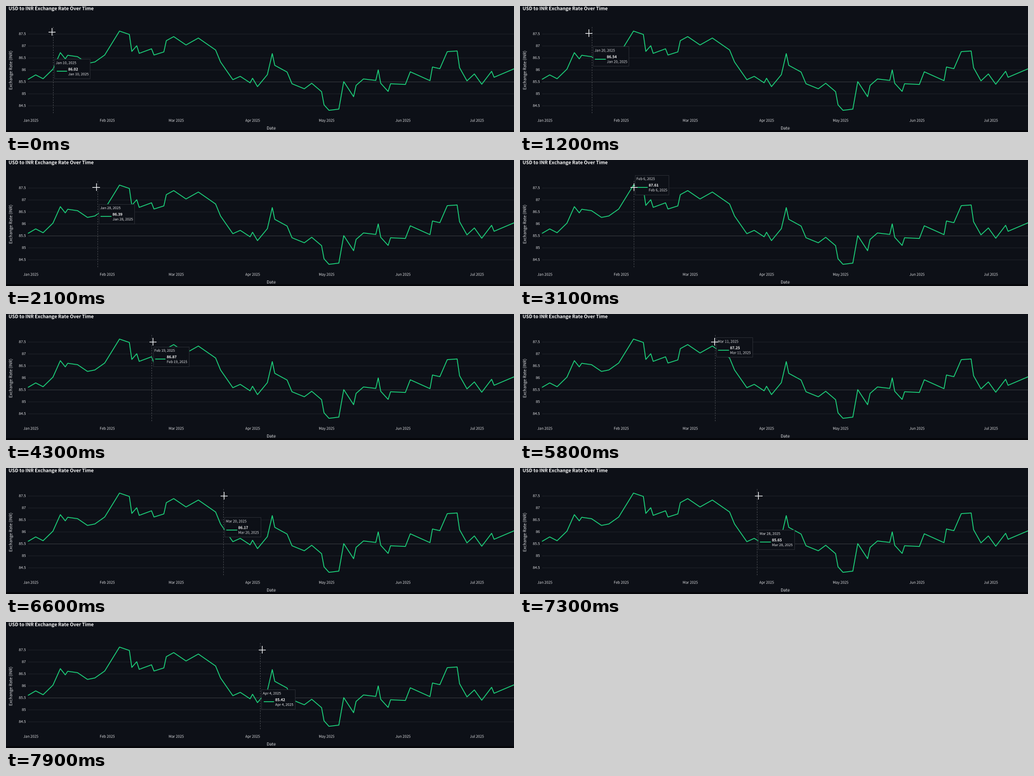
These frames come from a looping animation (800 px wide and 200 px high, 8 s). A matplotlib script:

```python
import numpy as np
import matplotlib.pyplot as plt
from matplotlib.animation import FuncAnimation
from matplotlib.patches import PathPatch, Rectangle
from matplotlib.textpath import TextPath
from matplotlib.transforms import Affine2D

W, H, DPI = 800, 200, 100
FRAMES, STEP = 80, 100
PX = 72 / DPI

BG, GRID, MID_GRID = "#0d1017", "#1c1f26", "#313439"
GREEN, INK = "#1ee083", "#e6e7ea"
MONTHS = "Jan Feb Mar Apr May Jun Jul Aug Sep Oct Nov Dec".split()
START = np.datetime64("2025-01-01")

# Turning points of the rate: day of the year, rate
TURNS = np.array([
    (-1, 85.60), (2, 85.78), (5, 85.62), (9, 86.02), (12, 86.71),
    (14, 86.45), (15, 86.60), (19, 86.54), (23, 86.26), (26, 86.32),
    (30, 86.61), (36, 87.61), (40, 87.47), (41, 86.76), (43, 87.00),
    (44, 86.68), (49, 86.87), (50, 86.61), (54, 86.74), (55, 87.21),
    (58, 87.38), (63, 87.03), (68, 87.32), (75, 86.82), (77, 86.32),
    (82, 85.58), (85, 85.72), (89, 85.45), (90, 85.64), (92, 85.29),
    (96, 85.79), (98, 86.67), (99, 86.18), (104, 85.90), (106, 85.41),
    (111, 85.20), (114, 85.43), (118, 85.08), (119, 84.53), (121, 84.30),
    (125, 84.35), (127, 85.50), (131, 84.87), (132, 85.34), (135, 85.61),
    (140, 85.55), (141, 85.99), (142, 85.43), (145, 85.09), (146, 85.41),
    (152, 85.38), (154, 85.91), (162, 85.54), (163, 86.11), (166, 86.04),
    (169, 86.75), (173, 86.78), (174, 86.08), (177, 85.53), (180, 85.82),
    (183, 85.39), (187, 85.93), (188, 85.68), (196, 86.03)])

# Pointer path: time, x, y
PATH = np.array([
    (0, 71.8, 40.6), (1200, 107.7, 42.6), (3100, 179.2, 42.6),
    (4300, 230.7, 43.5), (5000, 268.7, 43.5), (7900, 403.2, 43.5)])


def x_of(day):
    return 39 + 3.881 * day


def y_of(rate):
    return 120 - 38 * (rate - 85.5)


def day_of(date):
    return (date - START).astype(float)


def date_text(date):
    year, month, day = str(date).split("-")
    return f"{MONTHS[int(month) - 1]} {int(day)}, {year}"


class Label:
    """Text drawn as outlines, so that it sits between whole pixels."""

    def __init__(self, x=0, y=0, text=" ", size=5.7, align=0, angle=0,
                 weight="normal", color=INK, zorder=6):
        self.size, self.align, self.angle = size, align, angle
        self.font = {"family": "Noto Sans CJK JP", "weight": weight}
        self.patch = ax.add_patch(PathPatch(
            TextPath((0, 0), "0", size=size, prop=self.font),
            facecolor=color, lw=0, zorder=zorder))
        self.put(x, y, text)

    def put(self, x, y, text):
        path = TextPath((0, 0), text, size=self.size, prop=self.font)
        self.width = path.get_extents().x1 if len(path.vertices) else 0
        move = Affine2D().translate(-self.align * self.width,
                                    -0.37 * self.size)
        move.scale(1, -1).rotate_deg(-self.angle).translate(x, y)
        self.patch.set_path(path)
        self.patch.set_transform(move + ax.transData)


def stroke(x, y, color, width, **kw):
    return ax.plot(x, y, color=color, lw=width * PX, **kw)[0]


fig = plt.figure(figsize=(W / DPI, H / DPI), dpi=DPI, facecolor=BG)
ax = fig.add_axes([0, 0, 1, 1])
ax.set_xlim(0, W)
ax.set_ylim(H, 0)
ax.axis("off")

# Chart
dates = np.arange(START - 1, START + 197)
dates = dates[np.is_busday(dates)]
days = day_of(dates)
rates = np.interp(days, *TURNS.T)
xs, ys = x_of(days), y_of(rates)

ax.add_patch(Rectangle((0, 196.5), W, 4, color="#06070b", lw=0))
for rate in np.arange(84.5, 88, 0.5):
    y = y_of(rate)
    stroke([35, W], [y, y], MID_GRID if rate == 85.5 else GRID, 1, zorder=1)
    Label(31, y, f"{rate:g}", align=1)
for m in range(1, 8):
    first = np.datetime64(f"2025-{m:02d}-01")
    Label(x_of(day_of(first)), 181.5, f"{MONTHS[m - 1]} 2025", align=0.5)
Label(4, 3.8, "USD to INR Exchange Rate Over Time", 7.4, weight="bold",
      color="white")
Label(417.5, 193.7, "Date", 6.6, align=0.5)
Label(7.2, 102.3, "Exchange Rate (INR)", 6.6, align=0.5, angle=90)
stroke(xs, ys, GREEN, 1.25, zorder=3, solid_joinstyle="round")

# Hover parts
spike = stroke([0, 0], [33, 171], "#484b51", 0.9, zorder=4,
               dashes=(2.2, 2.2))
box = ax.add_patch(Rectangle((0, 0), 56, 31, facecolor=BG,
                             edgecolor="#2b2e35", lw=0.8 * PX, zorder=5))
head, foot = Label(size=5.6), Label(size=5.6)
value = Label(size=5.8, weight="bold", color="white")
swatch = stroke([0, 0], [0, 0], GREEN, 1.25, zorder=6)
bars = [stroke([0, 0], [0, 0], "#eceef0", 1.1, zorder=8) for _ in range(2)]


def draw(i):
    t = i * STEP
    cx, cy = (np.interp(t, PATH[:, 0], PATH[:, k]) for k in (1, 2))
    bars[0].set_data([cx - 5.2, cx + 5.2], [cy, cy])
    bars[1].set_data([cx, cx], [cy - 5.2, cy + 5.2])

    # The tooltip snaps to the nearest weekday
    k = np.argmin(abs(xs - (cx + 0.3)))
    x, y = xs[k], ys[k]
    day = date_text(dates[k])
    spike.set_xdata([x, x])
    head.put(x + 4.5, y - 10.1, day)
    value.put(x + 24, y + 0.1, f"{rates[k]:.2f}")
    foot.put(x + 24, y + 7.8, day)
    swatch.set_data([x + 5.6, x + 20.8], [y + 3.2, y + 3.2])
    box.set_xy((x + 2.5, y - 16.3))
    box.set_width(foot.width + 24)
    return [spike, box, head.patch, value.patch, foot.patch, swatch, *bars]


anim = FuncAnimation(fig, draw, frames=FRAMES, interval=STEP, repeat=True,
                     repeat_delay=0, blit=False)
plt.show()
```
